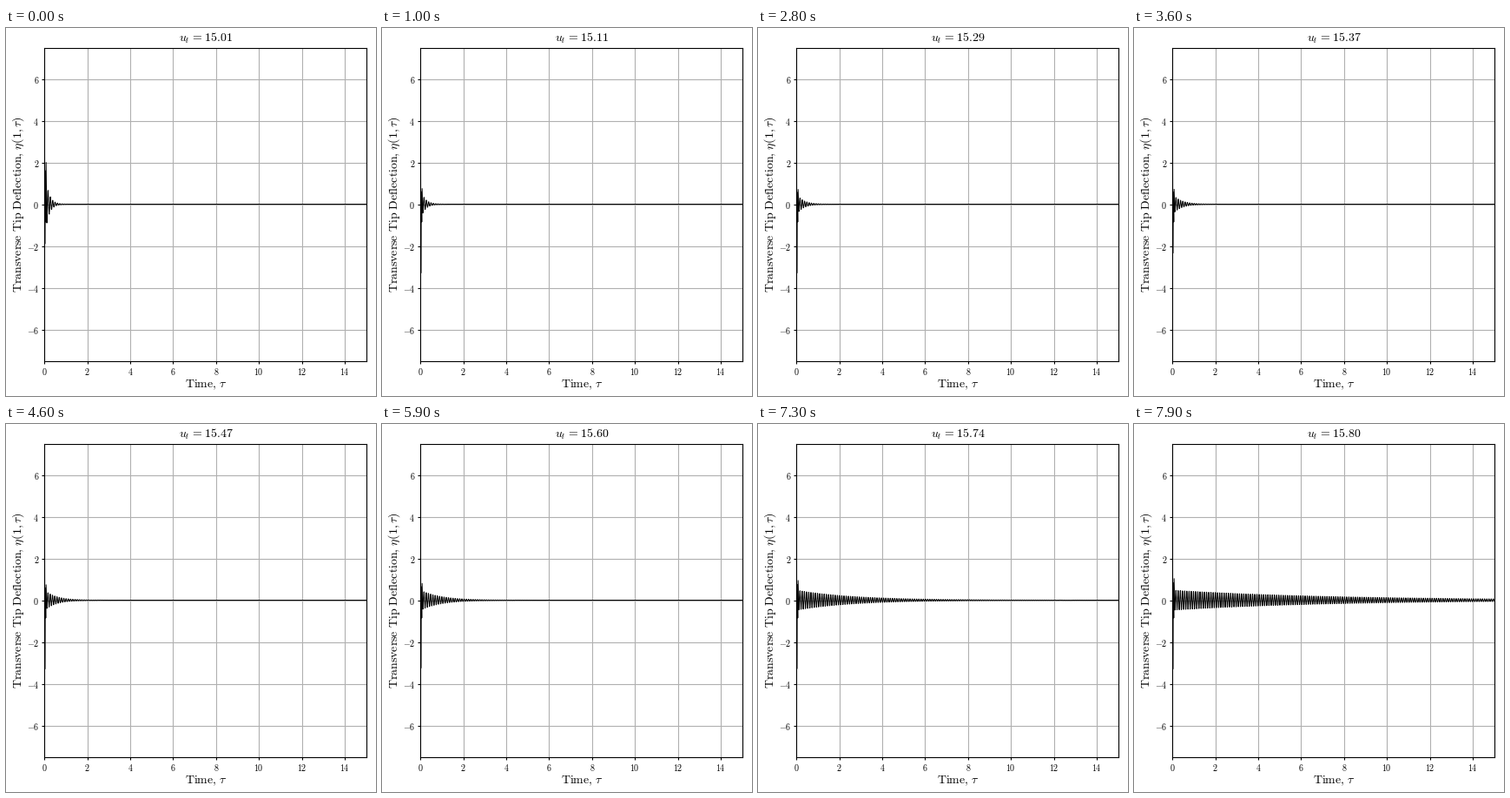
Recreate the animation shown at these times as a matplotlib script. Size 426 px wide and 423 px high, loop 8 s.

```python
import numpy as np
import matplotlib.pyplot as plt
from matplotlib.animation import FuncAnimation

W, H, DPI = 426, 423, 100
FRAMES, STEP_MS = 80, 100
X0, Y0, AX_W, AX_H = 44.3, 40.49, 370.3, 360

plt.rcParams.update({"mathtext.fontset": "cm", "font.size": 7.2})

TAIL_T = np.arange(0.11, 15.01, 0.005)
BURST_T = [0, 0.008, 0.018, 0.035, 0.06, 0.075]
TAU = np.concatenate([BURST_T, TAIL_T])


def speed(i):
    return 15.01 + 0.01 * i


def burst(i):
    """First swings after release; their height drifts with flow speed."""
    peak = 2.1 + 0.7 * np.cos(2 * np.pi * (i - 46) / 54)
    weak = np.cos(np.pi * i / 18.5) ** 8 * np.exp(-(i / 50) ** 4)
    dip = 3.3 - 1.4 * weak
    rebound = 0.7 + 0.35 * (i / FRAMES) ** 4 + 1.3 * np.exp(-i / 3)
    return [0, peak, -dip, 0.8 * rebound, -0.85, rebound]


def tail(i):
    """Oscillation whose damping fades towards the critical speed."""
    gap = 15.838 - speed(i)
    decay = 3.4 * gap + 4.2 * gap**2
    amp = 0.48 + 1.2 * np.exp(-i / 6)
    period = 0.11 - 0.008 * i / FRAMES
    phase = 2 * np.pi * (TAIL_T - TAIL_T[0]) / period
    return -amp * np.exp(-decay * TAIL_T) * np.cos(phase)


fig = plt.figure(figsize=(W / DPI, H / DPI), dpi=DPI, facecolor="white")
ax = fig.add_axes([X0 / W, Y0 / H, AX_W / W, AX_H / H])
ax.set(xlim=(0, 15), ylim=(-7.5, 7.5))
ticks_x, ticks_y = range(0, 15, 2), range(-6, 7, 2)
ax.set_xticks(ticks_x, [f"${v}$" for v in ticks_x])
ax.set_yticks(ticks_y, [f"${v}$" for v in ticks_y])
ax.tick_params(length=2.5, pad=2)
ax.grid(True)
ax.set_axisbelow(True)


def label(x, y, text, **kw):
    return fig.text(x / W, 1 - y / H, text, fontsize=10, ha="center",
                    va="baseline", rotation_mode="anchor", **kw)


title = label(230, 16, "")
label(230, 413, r"$\mathrm{Time,}\hspace{0.13}\tau$")
label(18, 203.3, r"$\mathrm{Transverse\ Tip\ Deflection,}\hspace{0.13}\eta(1,\tau)$",
      rotation=90)
line, = ax.plot([], [], color="black", lw=0.72)


def update(i):
    line.set_data(TAU, np.concatenate([burst(i), tail(i)]))
    title.set_text(rf"$u_l\hspace{{0.09}}=\hspace{{0.09}}{speed(i):.2f}$")
    return line, title


anim = FuncAnimation(fig, update, frames=FRAMES, interval=STEP_MS,
                     repeat=True, repeat_delay=0)
plt.show()
```
